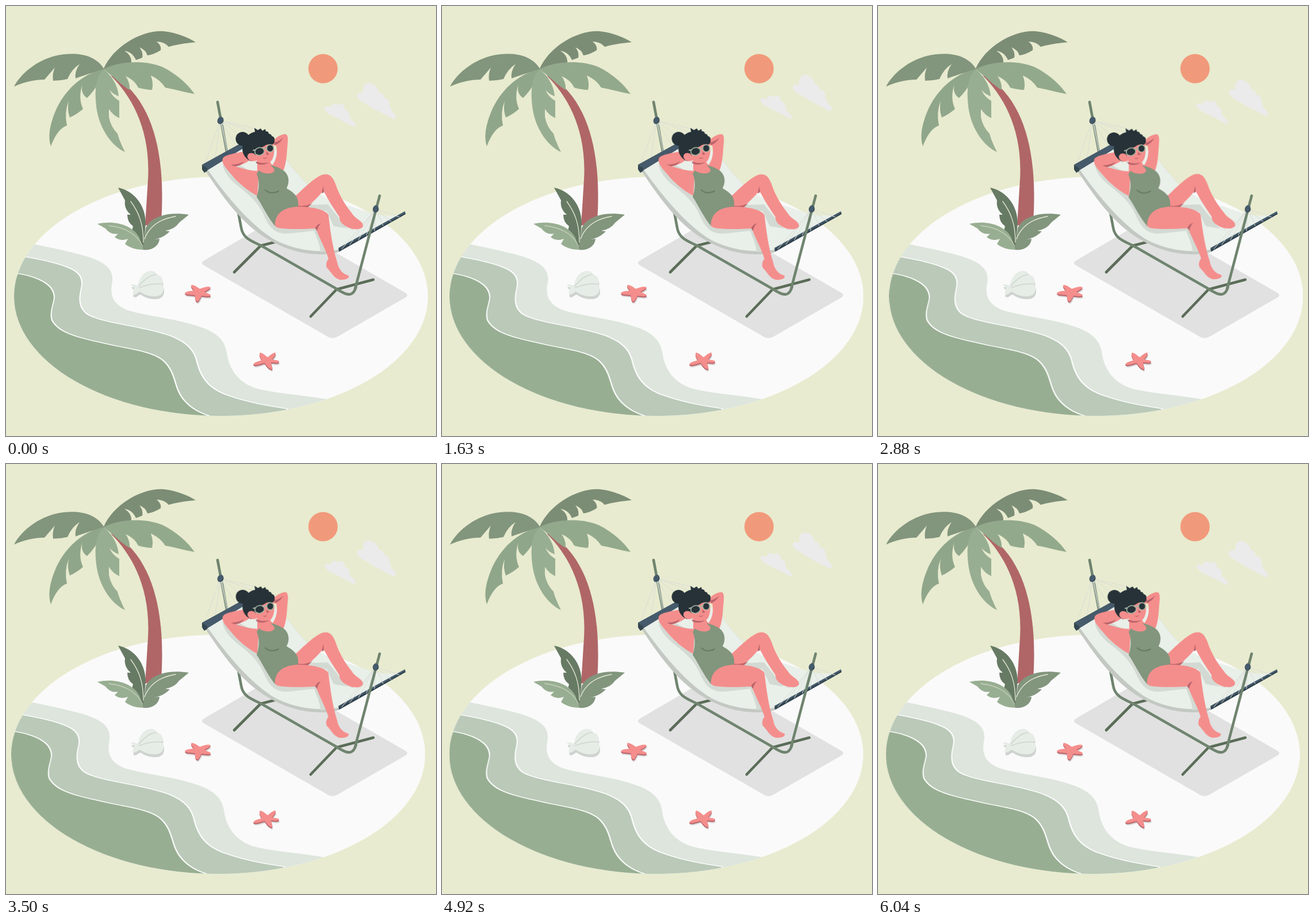
Recreate the animation shown at these times as an HTML page without scripts. Size 748 px wide and 748 px high, loop 6080 ms.

```html
<!DOCTYPE html>
<html lang="en">
<head>
<meta charset="utf-8">
<title>Beach rest</title>
<style>
html, body { margin: 0; width: 100%; height: 100%; overflow: hidden; background: #e8ebcf; }
svg { display: block; width: 100vw; height: 100vh; }
.isle, .clouds, .girl { animation: 6.08s linear infinite; }
.isle { animation-name: sway; }
.clouds { animation-name: drift; }
.girl { animation-name: rock; transform-origin: 498px 345px; }
@keyframes sway {
  0%, 100% { transform: translateX(0); }
  11.2%, 95.4% { transform: translateX(-1.5px); }
  21.7%, 87.2% { transform: translateX(3px); }
  33.7%, 56.7%, 74% { transform: translateX(-6px); }
  46.9%, 65.8% { transform: translateX(6px); }
}
@keyframes drift {
  0%, 55.9%, 99.5%, 100% { transform: translateY(0); }
  10.4% { transform: translateY(-6px); }
  20.6% { transform: translateY(-11px); }
  28.8%, 81.4% { transform: translateY(-15.2px); }
  35.7% { transform: translateY(-12px); }
  41.8% { transform: translateY(-9px); }
  61.7% { transform: translateY(-4.5px); }
  71.5% { transform: translateY(-10.5px); }
  93.3% { transform: translateY(-7px); }
}
@keyframes rock {
  0%, 28%, 56%, 81.4%, 100% { transform: rotate(0); }
  14%, 69% { transform: rotate(1deg); }
  42%, 91% { transform: rotate(-1deg); }
}
.line { fill: none; stroke-linecap: round; stroke-linejoin: round; }
.skin { fill: #f48e8c; }
.shade { fill: #b9636a; }
.hair { fill: #263238; }
.bar { fill: #455a6b; }
.pole { stroke: #6f846f; stroke-width: 4.6; }
.leg { stroke: #5b6d58; stroke-width: 4.6; }
.rope { stroke: #d9ddd8; stroke-width: 1; }
</style>
</head>
<body>
<svg viewBox="0 0 748 748">
<defs>
  <clipPath id="oval"><ellipse cx="374" cy="505" rx="360" ry="208"/></clipPath>
  <path id="mid" d="M0 433 L34 437 C62 442 96 449 115 459 C130 467 133 478 130 491 C125 512 126 529 145 539 C172 552 224 556 275 571 C312 582 325 598 330 615 C337 645 350 666 386 678 C420 690 455 696 488 701 L470 748 H0Z"/>
  <path id="deep" d="M0 463 L20 466 C52 471 84 484 83 508 C81 522 75 533 79 547 C93 573 135 579 187 591 C222 598 255 603 271 616 C289 631 291 649 298 668 C307 690 326 705 352 713 L340 748 H0Z"/>
  <path id="star1" d="M311 499 C317 495 322 496 327 495 C325 491 320 488 323 485 C329 486 333 489 337 492 C343 490 351 487 356 489 C355 492 349 495 345 497 C349 500 357 501 356 504 C351 506 345 504 340 504 C338 508 335 515 332 514 C328 511 330 506 328 503 C322 502 312 503 311 499Z"/>
  <path id="star2" d="M430 623 C433 619 440 618 445 616 C443 612 439 606 442 603 C448 604 451 608 455 611 C459 608 465 602 469 603 C470 607 465 611 463 615 C468 616 476 616 475 619 C473 622 466 620 461 620 C462 625 465 630 462 632 C456 630 453 625 450 621 C444 622 434 627 430 623Z"/>
  <path id="shell" d="M217 485 C221 482 227 487 230 486 C231 476 238 462 250 461 C257 460 261 463 262 467 C270 468 274 475 272 483 C276 491 274 500 268 503 C258 508 241 503 233 497 C229 498 225 504 221 501 C219 498 223 493 223 490Z"/>
</defs>

<rect width="748" height="748" fill="#e8ebcf"/>
<circle cx="551.5" cy="109" r="25.5" fill="#f19a7b"/>
<g class="clouds" fill="#ebebeb">
  <path d="M610 157 C610 150 617 149 622 151 C619 141 624 133 632 134 C641 135 647 141 649 151 C653 149 657 153 657 159 C664 160 668 166 667 173 C670 176 668 181 674 186 C680 191 679 198 674 197 L640 179 L614 163Z"/>
  <path d="M553 178 C556 174 562 174 565 177 C564 170 573 167 577 173 C582 167 589 170 590 181 C595 180 599 186 598 194 L607 204 C610 208 609 212 605 210 L560 187Z"/>
</g>

<g class="isle">
  <ellipse cx="374" cy="505" rx="360" ry="208" fill="#fafafa"/>
  <g clip-path="url(#oval)">
    <path fill="#dde5dd" d="M0 406 L52 415 C82 421 115 428 142 436 C176 447 187 460 185 479 C180 502 185 520 214 530 C252 541 294 543 337 558 C370 569 381 584 384 603 C388 632 404 656 438 666 C477 675 519 677 558 684 L540 748 H0Z"/>
    <use href="#mid" x="2" y="-1" fill="#fff"/>
    <use href="#mid" fill="#bac9b8"/>
    <use href="#deep" x="2" y="-1" fill="#fff"/>
    <path class="line" stroke="#fff" stroke-width="2.5" d="M298 668 C308 691 328 706 352 713"/>
    <use href="#deep" fill="#98ae92"/>
  </g>
</g>

<path fill="#e1e1e1" d="M344 443 L462 374 Q470 370 478 374 L695 499 Q701 503 695 507 L577 575 Q569 580 561 576 L344 451 Q338 447 344 443Z"/>

<!-- palm -->
<path fill="#b06667" d="M182 121 C219 157 252 216 247 302 L242 382 L270 376 C276 284 267 178 194 125Z"/>
<path fill="#7c8d76" d="M170 109 C187 70 237 41 275 44 C299 47 317 55 330 63 C310 65 297 67 283 71 C278 65 271 62 262 62 Q271 69 269 77 Q258 84 246 86 Q243 76 232 72 Q239 80 237 90 L226 94 Q220 80 206 78 Q219 86 218 98 L176 112Z"/>
<path fill="#82957d" d="M171 110 C157 87 130 81 101 84 C61 88 27 115 14 140 C32 132 50 128 67 128 L85 107 Q80 119 82 130 Q95 130 107 127 Q114 110 128 101 Q119 114 121 126 C137 120 152 115 171 111Z"/>
<path fill="#93a98c" d="M170 110 C197 95 243 94 272 106 C297 118 317 137 328 153 C310 150 294 145 277 142 Q268 128 252 121 Q257 134 254 146 Q240 145 230 142 Q224 129 208 122 Q216 133 215 146 C203 139 193 129 186 123Z"/>
<path fill="#90a68a" d="M170 110 C131 118 101 148 86 183 C75 209 73 229 78 244 C85 225 95 211 106 208 Q101 186 109 165 Q106 181 111 194 Q124 188 134 179 Q125 160 133 136 Q129 152 141 160 C156 146 164 128 171 112Z"/>
<path fill="#98ae92" d="M170 110 C152 127 155 159 158 181 C164 216 185 244 207 254 C200 240 196 230 194 222 Q182 210 179 193 L179 179 Q186 190 197 195 L197 165 Q185 158 180 146 Q187 154 196 157 C195 139 184 121 170 110Z"/>

<!-- bush -->
<path fill="#677a64" d="M195 316 C224 322 242 347 243 376 L239 424 C235 409 227 400 219 391 L221 383 Q211 376 211 363 L217 363 Q205 353 207 338Z"/>
<path fill="#82957d" d="M318 363 C285 358 254 364 243 386 L238 424 C253 426 266 418 267 405 L258 406 Q273 404 285 392 L277 391 Q294 388 301 377Z"/>
<path fill="#98ae92" d="M159 379 C189 372 221 381 232 403 L239 424 C224 424 213 419 207 414 L212 405 Q199 410 189 402 L195 396 Q182 399 173 387Z"/>
<g class="line" stroke="#e5ead5" stroke-width="1.3">
  <path d="M217 340 C231 359 239 379 239 411"/>
  <path d="M241 405 C250 382 270 370 295 366"/>
  <path d="M179 382 C211 386 228 398 238 418" opacity=".6"/>
</g>

<!-- shore finds -->
<use href="#shell" x="1" y="5" fill="#cfd3cf"/>
<use href="#shell" fill="#e6ece6"/>
<path class="line" stroke="#cdd4cd" stroke-width="1.5" d="M231 487 C242 475 250 468 262 467 M232 490 C247 484 260 482 272 484"/>
<g fill="#d6d6d6"><use href="#star1" x="1" y="4"/><use href="#star2" x="1" y="4"/></g>
<g class="shade"><use href="#star1" y="2"/><use href="#star2" y="2"/></g>
<g class="skin"><use href="#star1"/><use href="#star2"/></g>

<!-- stand -->
<path class="line leg" d="M397 463 L443 417 L490 405 M530 540 L575 493 L639 476"/>
<path class="line pole" d="M368 167 L409 385 C412 405 428 409 444 417 L575 492 C593 504 604 507 609 488"/>
<path class="line" stroke="#dfe4dc" stroke-width="1" d="M375 203 L386 252"/>
<path class="line rope" d="M373 199 L346 274 M373 199 L364 264 M373 199 L384 253 M373 199 L400 243 M373 199 L417 232 M373 199 L434 221 M373 199 L448 217"/>

<!-- cloth -->
<path fill="#c3c9c2" d="M345 284 C375 329 409 379 456 406 C494 429 540 438 580 428 L580 418 L360 277Z"/>
<path fill="#e9efe9" d="M349 282 L430 235 L480 256 C508 300 545 338 598 348 C630 358 655 371 690 361 L579 424 C545 430 503 425 470 408 C427 384 382 329 349 282Z"/>
<path fill="#d3dad3" d="M381 262 C370 278 385 298 402 312 C431 334 440 346 448 363 C457 384 467 397 491 396 L536 391 C541 404 547 417 547 428 L570 426 L560 390 L500 345 L430 290Z"/>
<path fill="#d3dad3" d="M505 347 L560 345 L585 376 C590 386 602 391 607 389 L570 383 L558 357 Z"/>
<path class="line" stroke="#dfe3de" stroke-width="1" d="M484 262 C502 286 512 300 526 312"/>
<path class="bar" d="M341 276 L408 239 L418 241 L412 248 L350 286 L345 290 L341 284Z"/>
<path fill="#34464f" d="M341 277 L350 282 L350 287 L345 290 L341 284Z"/>
<path class="bar" d="M578 421 L694 357 L695 362 L580 427Z"/>
<path fill="#2f414b" d="M578 424 L695 360 L695 362 L580 427Z"/>
<path class="line rope" d="M643 353 L584 423 M643 353 L598 415 M643 353 L613 407 M643 353 L627 399 M643 353 L641 391 M643 353 L656 382 M643 353 L670 375 M643 353 L684 367"/>
<path class="line pole" d="M607 493 L650 330"/>
<g class="bar">
  <ellipse cx="373" cy="199" rx="5.2" ry="6.5" transform="rotate(25 373 199)"/>
  <ellipse cx="643" cy="353" rx="5" ry="6.5" transform="rotate(15 643 353)"/>
</g>
<path fill="#2f414b" d="M371 204 Q378 203 378 196 Q380 205 371 204Z M641 359 Q648 357 648 350 Q650 359 641 359Z"/>

<g class="girl">
  <path class="skin" d="M460 241 C466 229 480 222 487 223 C492 226 490 237 489 249 C488 269 485 284 480 290 L462 279 C470 269 473 256 470 243Z"/>
  <path class="shade" d="M466 238 Q476 235 482 229 Q477 239 468 242Z"/>
  <path class="skin" d="M377 266 C379 258 402 256 425 251 L430 263 C421 272 408 278 399 279 C415 284 428 287 440 287 L437 330 C421 322 402 306 392 293 C384 284 374 273 377 266Z"/>
  <path class="shade" d="M391 276 Q405 276 414 270 Q409 278 398 279Z"/>
  <path class="skin" d="M437 260 L460 266 C458 274 463 278 475 281 L470 296 L437 297Z"/>
  <path class="skin" d="M501 333 C519 316 540 295 553 293 C565 291 569 300 573 309 C580 330 590 346 602 361 C608 371 622 374 621 383 C618 390 605 389 597 386 C588 382 580 377 580 367 C570 352 560 337 552 321 C541 335 527 348 516 354 L503 354Z"/>
  <path class="shade" d="M506 347 Q519 350 533 343 L522 353 L506 355Z M552 313 L553 324 L549 326Z"/>
  <path fill="#82957d" d="M440 286 C447 292 462 294 467 287 C467 282 463 280 460 277 C467 278 479 282 486 289 C493 297 493 308 488 317 C496 322 507 328 508 340 C510 350 505 355 493 359 L468 383 C455 367 446 347 436 332 C441 317 441 303 436 292Z"/>
  <path class="line" stroke="#677a64" stroke-width="2" d="M451 320 Q461 329 474 322"/>
  <path class="skin" d="M468 378 C470 358 486 349 512 349 C540 350 558 356 561 364 C564 390 568 420 576 445 C578 457 585 466 596 469 C598 474 590 477 580 476 C570 473 566 463 558 455 C556 449 558 443 561 440 C557 425 545 404 539 387 C520 388 490 389 474 386 C468 384 467 381 468 378Z"/>
  <path class="shade" d="M538 387 Q540 380 548 378 Q543 382 541 391Z"/>
  <!-- head -->
  <path class="skin" d="M428 250 C428 238 451 228 462 236 C469 246 467 261 462 269 C455 276 443 271 436 269Z"/>
  <path class="shade" d="M434 270 Q444 275 458 272 Q446 279 436 274Z"/>
  <circle class="hair" cx="411.5" cy="231" r="12"/>
  <path class="hair" d="M426 270 C414 265 409 253 412 242 C414 231 421 221 433 219 L432 212 L438 216 L443 213 L446 217 L451 214 L452 218 Q457 218 457 222 Q462 223 462 226 Q468 228 467 233 Q468 239 463 241 Q454 239 449 244 C441 247 434 251 433 264Z"/>
  <path class="skin" d="M433 258 C426 253 419 257 420 263 C422 270 430 272 436 268Z"/>
  <path class="line" stroke="#a8b8a5" stroke-width="1.8" d="M430 251 L436 250 M448 249 Q451 246 454 248"/>
  <g class="hair" stroke="#a8b8a5" stroke-width="1.6">
    <ellipse cx="441" cy="253" rx="8.3" ry="6.6" transform="rotate(-12 441 253)"/>
    <ellipse cx="459.5" cy="247.5" rx="6" ry="6.3"/>
  </g>
  <path class="shade" d="M453 253 L458 258 L453 259Z M446 264 Q451 265 455 263 Q451 268 446 264Z"/>
</g>
</svg>
</body>
</html>
```
